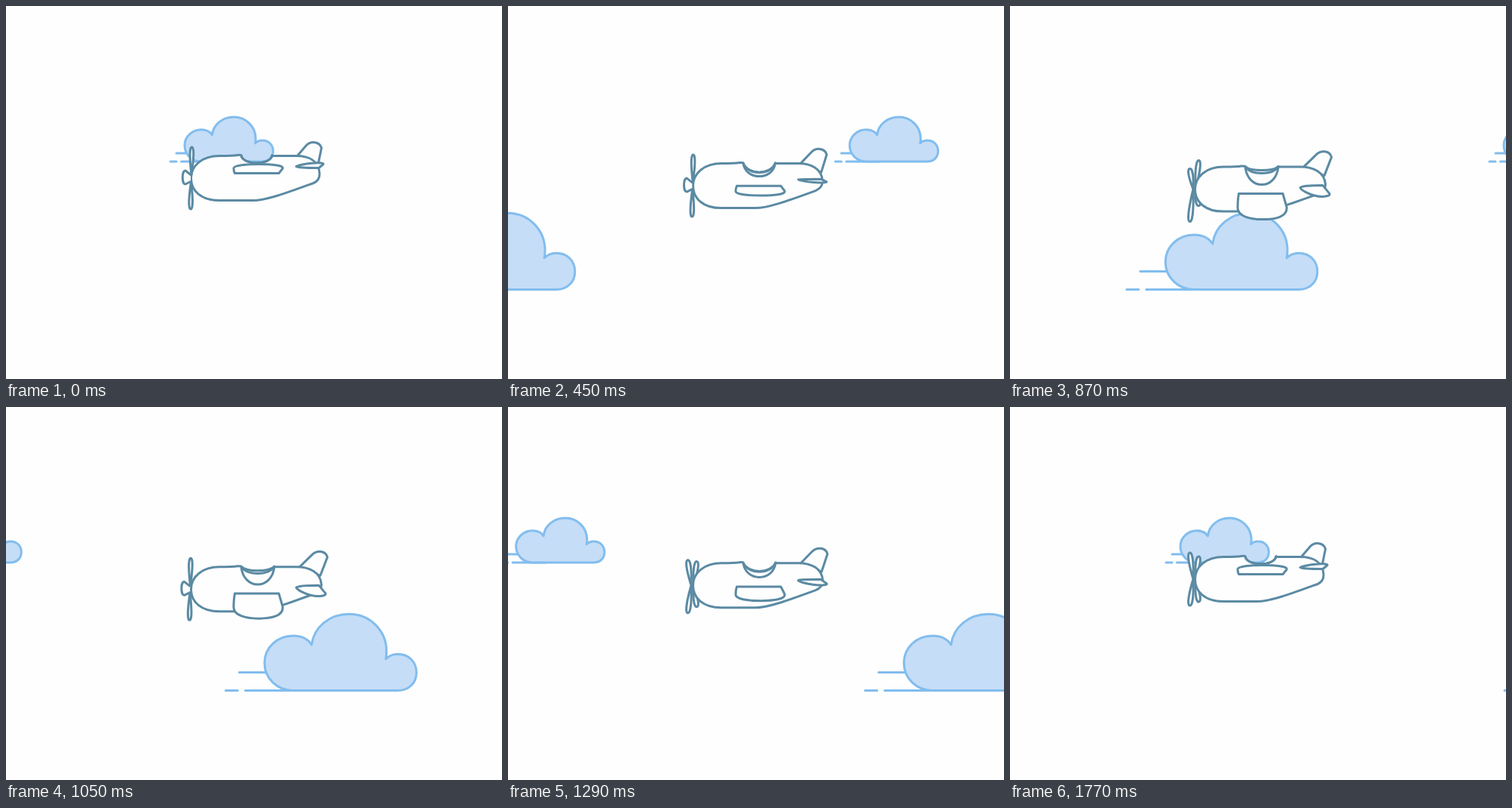
These frames come from a looping animation (658x494 px, 1.8 s). An HTML page:

```html
<!DOCTYPE html>
<html lang="en">
<head>
<meta charset="utf-8">
<title>Plane in the clouds</title>
<style>
  html, body { margin: 0; width: 100%; height: 100%; overflow: hidden; background: #fefefe; }
  svg { display: block; width: 658px; height: 494px; }
  path { stroke-width: 3; stroke-linecap: round; stroke-linejoin: round; vector-effect: non-scaling-stroke; }
  .cloud path { fill: #c5ddf7; stroke: #82bdee; }
  .plane path { fill: #fefefe; stroke: #5b8aa3; }
  .plane .line { fill: none; }
</style>
</head>
<body>
<svg viewBox="0 0 658 494">
  <g id="smallCloud" class="cloud"></g>
  <g id="bigCloud" class="cloud"></g>
  <g class="plane">
    <path id="farBlades"/>
    <path id="fin"/>
    <path id="body"/>
    <path id="innerRim" class="line"/>
    <path id="nearRim" class="line"/>
    <path id="stabilizer"/>
    <path id="wing"/>
    <path id="nearBlades"/>
    <path id="hub"/>
  </g>
</svg>
<script>
const LOOP = 1800, STEP = 30;
const $ = id => document.getElementById(id);
const draw = (id, d) => $(id).setAttribute('d', d);
const move = (id, x, y) => $(id).setAttribute('transform', `translate(${x} ${y})`);

const PUFF = 'M0-37C0-57 17-73 38-73C50-73 58-69 63-61C66-85 87-102 113-102' +
  'C141-102 163-80 163-52Q163-47 162-42C167-47 173-48.5 178-48.5' +
  'C193-48.5 203-38 203-24C203-10 193 0 178 0H38C17 0 0-16 0-37Z';

function buildCloud(id, left, scale, streaks) {
  $(id).innerHTML = `<path d="${streaks}"/>` +
    `<path transform="translate(${left} 0) scale(${scale})" d="${PUFF}"/>`;
}
buildCloud('smallCloud', 20, 0.578, 'M1 0H9M15.5 0H60M9-11H30');
buildCloud('bigCloud', 52.5, 0.993, 'M1 0H17M27 0H90M19-24H60');

// Rises from 0 to 1, rests between the two peak times and sinks back to 0
function swell(time, peak, leave, end, bend) {
  const u = time < peak ? (time / peak) ** bend : (end - Math.max(time, leave)) / (end - leave);
  return (1 - Math.cos(Math.PI * Math.max(0, u))) / 2;
}

function blade(x, y, tx, ty, width) {
  const dx = tx - x, dy = ty - y, len = Math.hypot(dx, dy);
  const nx = -dy / len * width, ny = dx / len * width;
  const side = s => [`${x + dx * 0.4 + nx * 0.5 * s} ${y + dy * 0.4 + ny * 0.5 * s}`,
                     `${tx + nx * s} ${ty + ny * s}`];
  const [l1, l2] = side(1), [r1, r2] = side(-1);
  return `M${x} ${y}C${l1} ${l2} ${tx} ${ty}C${r2} ${r1} ${x} ${y}Z`;
}

function drawPropeller(time, bob, roll) {
  const y = 228 + bob;
  const upright = Math.round(time / STEP) % 5 < 3;
  if (upright) {
    const x = 246 - 1.5 * roll;
    draw('farBlades', '');
    draw('nearBlades', blade(x, y - 5, x + 0.5, y - 41, 4) + blade(x - 0.5, y + 5, x - 1, y + 41, 4));
    draw('hub', `M${x - 1} ${y - 4.5}L${x - 8} ${y - 10}` +
      `C${x - 13} ${y - 10} ${x - 13} ${y + 8} ${x - 8} ${y + 8}L${x - 1} ${y + 4.5}`);
  } else {
    const lean = 8 * roll ** 4;
    const pair = (x, tx, reach, shift) => [-1, 1].map(s =>
      blade(x, y, tx, y + s * reach + shift, 4.8)).join('');
    draw('farBlades', pair(246, 250.5, 30, -lean));
    draw('nearBlades', pair(243, 238.5, 35, lean));
    draw('hub', '');
  }
}

function drawPlane(time) {
  const bob = 14.6 * swell(time, 880, 880, 1770, 0.7);
  const roll = swell(time, 860, 980, 1770, 1);
  const Y = v => v + bob;
  const right = 353 + 3 * roll, end = 416 + 2.5 * roll, top = Y(198);

  const bowl = (bottom, inset) => {
    const c = top + (bottom - top) * 4 / 3;
    return `C${right - inset} ${c} ${312 + inset} ${c} 312 ${top}`;
  };
  const near = Y(208 + 14 * roll);
  const inner = Y(208 + 12 * roll * (1 - roll) - roll);
  const far = inner - 4 * roll ** 4;
  const inset = 3 + 5 * roll;
  draw('body', `M312 ${top}Q311 ${Y(197)} 307 ${Y(197.5)}C301 ${Y(198.5)} 296 ${Y(198.5)} 283 ${Y(198.5)}` +
    `C261 ${Y(198.5)} 245.5 ${Y(211)} 245.5 ${Y(228)}C245.5 ${Y(245)} 259 ${Y(257.5)} 283 ${Y(257.5)}` +
    `H328C346 ${Y(257.5)} 375 ${Y(246.5)} 408 ${Y(234.5)}C414 ${Y(232)} ${end} ${Y(228)} ${end} ${Y(222)}` +
    `C${end - 1} ${Y(205)} 402 ${Y(198.5)} 385 ${Y(198.5)}H${right + 1}L${right} ${top}${bowl(far, inset)}Z`);
  draw('innerRim', `M${right} ${top}${bowl(inner, inset)}`);
  draw('nearRim', `M${right} ${top}${bowl(near, 3)}`);

  const fx = 8 * roll, fy = Y(-2.5 * roll);
  draw('fin', `M${386 + 3 * roll} ${Y(199)}L${398 + fx} ${185 + fy}` +
    `C${404 + fx} ${178.5 + fy} ${416 + fx} ${179 + fy} ${418.5 + fx} ${188 + fy}` +
    `L${414 + 3 * roll} ${Y(210)}Z`);

  const front = Y(212.5 + 13.5 * roll), back = front + 2 - 5 * roll;
  const tipX = 421 + 3 * roll, tipY = front - 3 + 11 * roll;
  const bulge = -5 + 17.5 * roll, B = v => front + bulge * v;
  draw('stabilizer', `M385 ${front}C387 ${front + (back - front) * 0.7} 400 ${back} 415 ${back}` +
    `L${tipX} ${tipY}C${tipX + 1} ${B(1)} 411 ${B(1)} 405 ${B(0.85)}` +
    `C396 ${B(0.7)} 386 ${B(0.25)} 385 ${front}Z`);

  const root = Y(221.5 + 12.5 * roll), depth = -12 + 46 * roll, W = v => root + depth * v;
  draw('wing', `M303.5 ${root}H362L367 ${W(0.52)}C368.5 ${W(0.9)} 352 ${W(1)} 335 ${W(1)}` +
    `C318 ${W(1)} 302 ${W(0.87)} 302 ${W(0.55)}Q302 ${W(0.25)} 303.5 ${root}Z`);

  drawPropeller(time, bob, roll);
}

function render(time) {
  const smallX = time < 960 ? 217 + 0.4805 * time : -117 + 0.4486 * (time - 1050);
  const bigX = Math.min(655, 17 + 0.7595 * (time - 690));
  move('smallCloud', smallX, 206);
  move('bigCloud', bigX, 375.5);
  drawPlane(time);
}

const start = performance.now();
function tick() {
  const elapsed = (performance.now() - start) % LOOP;
  render(Math.floor(elapsed / STEP) * STEP);
  requestAnimationFrame(tick);
}
tick();
</script>
</body>
</html>
```
